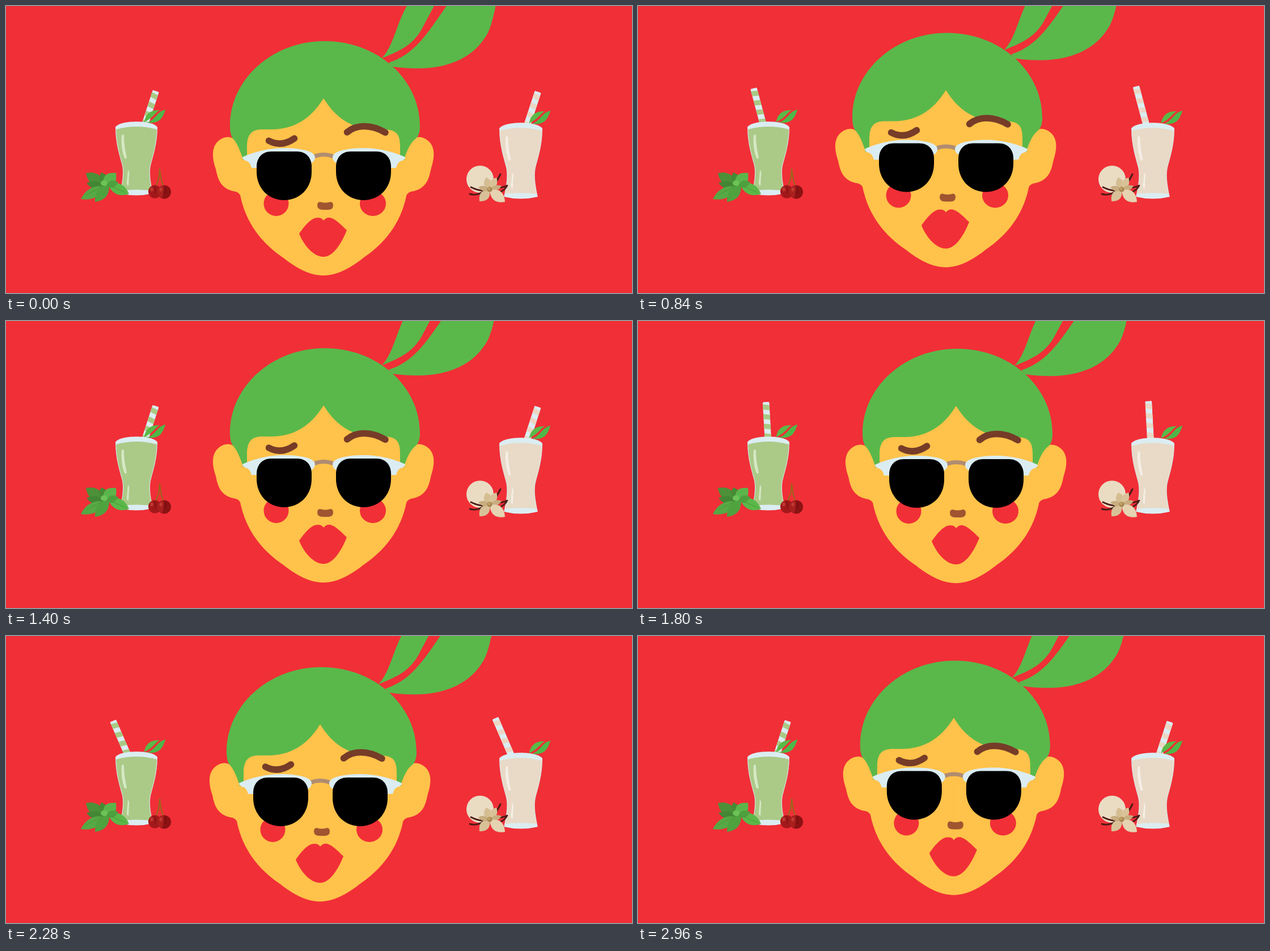
An HTML page with a canvas that plays this animation: 1104 px wide and 507 px high, repeating every 3 s.

```html
<!DOCTYPE html>
<html lang="en">
<head>
<meta charset="utf-8">
<title>Smoothies</title>
<style>
html, body { margin: 0; width: 100%; height: 100%; overflow: hidden; background: #f12f37; }
canvas { display: block; width: 100%; height: 100%; }
</style>
</head>
<body>
<canvas id="stage" width="1104" height="507"></canvas>
<script>
const ctx = document.getElementById('stage').getContext('2d');
const LOOP = 3000, STEP = 40, RAD = Math.PI / 180;
const RED = '#f12f37', GREEN = '#5ab84a', SKIN = '#ffc24a', GLASS = '#dbedf2';
const BROW = '#763c28', POD = '#4d1c18';

// Head drift: [time, x, y]
const drift = [
  [0, 0, 0], [360, -4, -5], [560, -9, -9], [840, -17, -14.5], [1120, -9, -11],
  [1400, 0, -14], [1800, 1, -13], [2140, -3.5, -5.2], [2280, -6, -7],
  [2800, -5, -14.5], [2960, -3.2, -18.6]
];
// Straw swing: [time, side], side 1 is right and -1 is left
const swing = [[0, 1], [605, -1], [1370, 1], [2225, -1], [2965, 1], [3700, -1]];

function segment(keys, t) {
  let i = 0;
  while (i < keys.length - 2 && t >= keys[i + 1][0]) i++;
  return i;
}

function slope(keys, i, k) {
  const a = keys[Math.max(i - 1, 0)], b = keys[Math.min(i + 1, keys.length - 1)];
  return (b[k] - a[k]) / (b[0] - a[0]);
}

function spline(keys, t, k) {
  const i = segment(keys, t), a = keys[i], b = keys[i + 1];
  const d = b[0] - a[0], u = (t - a[0]) / d, v = 1 - u;
  return a[k] * v * v * (1 + 2 * u) + b[k] * u * u * (3 - 2 * u)
    + d * u * v * (slope(keys, i, k) * v - slope(keys, i + 1, k) * u);
}

function strawAngle(t) {
  const i = segment(swing, t), a = swing[i], b = swing[i + 1];
  return 21 * a[1] * Math.cos(Math.PI * (t - a[0]) / (b[0] - a[0]));
}

function fill(d, color) {
  ctx.fillStyle = color;
  ctx.fill(new Path2D(d));
}

function line(d, color, width, cap = 'round') {
  ctx.strokeStyle = color;
  ctx.lineWidth = width;
  ctx.lineCap = cap;
  ctx.stroke(new Path2D(d));
}

function disc(x, y, rx, color, ry = rx) {
  ctx.fillStyle = color;
  ctx.beginPath();
  ctx.ellipse(x, y, rx, ry, 0, 0, 7);
  ctx.fill();
}

function at(x, y, draw, sx = 1, sy = 1) {
  ctx.save();
  ctx.translate(x, y);
  ctx.scale(sx, sy);
  draw();
  ctx.restore();
}

// Draws once as given and once mirrored around the vertical line x = mid
function both(mid, draw) {
  draw();
  at(2 * mid, 0, draw, -1);
}

// Pointed petal from a to b, bulging by w on each side
function petal(x1, y1, x2, y2, w, color) {
  const l = Math.hypot(x2 - x1, y2 - y1);
  const nx = (y1 - y2) / l * w, ny = (x2 - x1) / l * w;
  const mx = (x1 + x2) / 2, my = (y1 + y2) / 2;
  fill(`M${x1} ${y1}Q${mx + nx} ${my + ny} ${x2} ${y2}Q${mx - nx} ${my - ny} ${x1} ${y1}`, color);
}

function ponytail() {
  fill('M663 92C684 70 688 32 708 -2H756L732 43C718 66 700 78 663 92Z', GREEN);
  fill('M675 100C722 85 744 47 778 -2H864C860 16 857 32 850 47C828 88 780 121 681 107Z', GREEN);
}

function head() {
  ponytail();
  both(559.7, () => fill(
    'M560 180L418 215L404 237C396 229 384 230 375 238C361 250 364 270 370 288'
    + 'C374 308 379 321 400 327Q410 328 413 334C423 384 452 420 490 445.5C517 467 539 476 560 476Z', SKIN));
  fill('M560 163L600 207L650 222L690 260L560 280L430 260L470 215Z', SKIN);
  fill('M418 272L417 268C411 250 406 240 400 234C396 228 395 220 395 212C395 129 470 62 562 62'
    + 'C655 62 730 129 730 212C730 220 729 228 723 234C715 240 709 250 703 268V272H695V248'
    + 'C695 226 688 219 668 218H650C614 217 584 202 560 163C536 202 506 217 470 218H452'
    + 'C433 218 425 227 425 249V272Z', GREEN);

  disc(476.5, 349, 22, RED);
  disc(647, 349, 23, RED, 22);
  line('M463.5 238Q486 250 508.5 234', BROW, 11.5);
  line('M601.5 223C618 209 644 209 669 223.5', BROW, 11.5);

  line('M543 266Q560 259 578 266', '#b08c70', 7, 'butt');
  both(560.5, () => {
    fill('M417 267C434 259 460 251 490 251C522 251 545 257 545 267Q545 277 534 278L450 286H433'
      + 'Q430 274 422 273Q417 271 417 267Z', GLASS);
    fill('M468 257H513C529 257 539 268 539 284V293C539 322 518 343 490.5 343'
      + 'C463 343 442 322 442 293V284C442 268 452 257 468 257Z', '#000');
  });

  fill('M554 346Q563 349 572 346Q577 346 577 352Q577 360 568 360H559Q549 360 549 352Q549 346 554 346Z', '#a05430');
  fill('M517 402C528 387 538 374 550 374Q557 374 560 379Q565 373 572 374C583 377 592 388 601 396'
    + 'C594 414 579 443 560 443C541 443 524 420 517 402Z', RED);
}

function straw(px, py, turn, tilt, color) {
  ctx.save();
  ctx.translate(px, py);
  ctx.rotate(turn * RAD);
  ctx.translate(0, -107);
  ctx.rotate(tilt * RAD);
  ctx.beginPath();
  ctx.roundRect(-6, 0, 12, 84, 2);
  ctx.clip();
  ctx.fillStyle = GLASS;
  ctx.fillRect(-6, 0, 12, 84);
  for (let y = 5; y < 84; y += 17) fill(`M-6 ${y - 1}L6 ${y + 1}V${y + 10}L-6 ${y + 8}Z`, color);
  ctx.restore();
}

function glass(color, shine) {
  fill('M0 10C8 -3 66 -3 74 10C74 40 66 62 62 78C59 94 63 112 66 127Q37 134 8 127'
    + 'C11 112 15 94 12 78C8 62 0 40 0 10Z', GLASS);
  fill('M1 14Q37 4 73 14C72 42 65 63 61 78C58 95 62 110 64 122Q37 119 10 122'
    + 'C12 110 16 95 13 78C9 63 2 42 1 14Z', color);
  fill('M11 25Q13 21 15 25C15 42 18 54 20 64Q17 68 15 62C11 50 10 36 11 25Z', shine);
  fill('M22 86Q25 86 24 96C23 102 24 107 23 113Q20 114 20 108Z', shine);
}

function sprig() {
  fill('M0 22C3 6 13 0 28 1C21 3 18 14 0 22Z', '#5ab947');
  fill('M5 23C22 17 22 3 38 0C33 10 32 26 5 23Z', '#4fb748');
}

function mint() {
  petal(174, 318, 141, 295, 20, '#4c9038');
  petal(176, 320, 142, 313, 14, '#438634');
  petal(176, 316, 168, 294, 14, '#468b35');
  petal(175, 319, 132, 341, 18, '#56a944');
  petal(182, 316, 157, 346, 18, '#50a23f');
  petal(172, 318, 194, 295, 21, '#5cb54a');
  petal(180, 315, 217, 332, 19, '#5bb848');
  petal(176, 318, 198, 311, 12, '#4e9f3e');
  disc(173, 313, 6, '#6cc257', 5);
  line('M172 318L141 334M184 318L210 329', '#469139', 0.8);
}

function cherries() {
  line('M271 288Q271 306 263 320M271 288Q273 307 278 320', '#98691c', 2.2);
  disc(262.5, 328, 11.5, '#a3191b');
  disc(279, 328.5, 12, '#8c1214');
  fill('M267 328A12 12 0 0 1 279 316.5L276 340A12 12 0 0 1 267 328Z', '#a9201f');
  disc(257, 324, 2.5, '#c03a32', 3.5);
  disc(273, 324, 2.5, '#c03a32', 3.5);
  line('M262 319Q265 326 263 331M279 319Q283 325 281 331', '#6d0d10', 1.2);
}

function vanilla() {
  disc(836, 306, 24, '#e9dcc3');
  line('M820 320Q831 326 846 327M818 332Q830 336 846 326M858 318Q866 310 872 297', POD, 3);
  line('M862 321Q874 322 884 317M864 329Q876 330 883 319', POD, 2.6);
  petal(853, 325, 847, 303, 14, '#d5bd92');
  petal(853, 325, 865, 303, 13, '#d9c298');
  petal(853, 325, 874, 318, 9, '#c8ad80');
  petal(853, 325, 835, 345, 16, '#d8c198');
  petal(853, 325, 880, 346, 19, '#e5d3b1');
  petal(853, 325, 833, 320, 9, '#c8ad80');
  disc(853, 324, 4.5, '#a98752');
  disc(852, 323, 2, '#c9a96f');
}

function render(t) {
  ctx.fillStyle = RED;
  ctx.fillRect(0, 0, 1104, 507);
  const turn = strawAngle(t);

  straw(226, 250, turn, -3, '#a9c985');
  at(193, 204, () => glass('#abca88', '#d6e8c4'));
  at(243.5, 183, sprig);
  mint();
  cherries();

  straw(892, 248, turn + 4.6, -7.5, '#ead7c5');
  at(870, 206, () => glass('#e8dac7', '#f5eee4'), 76 / 74, 135 / 131);
  at(922.5, 185, sprig);
  vanilla();

  at(spline(drift, t, 1), spline(drift, t, 2), head);
}

const start = performance.now();
function tick() {
  const t = (performance.now() - start) % LOOP;
  render(Math.floor(t / STEP) * STEP);
  requestAnimationFrame(tick);
}
tick();
</script>
</body>
</html>
```
